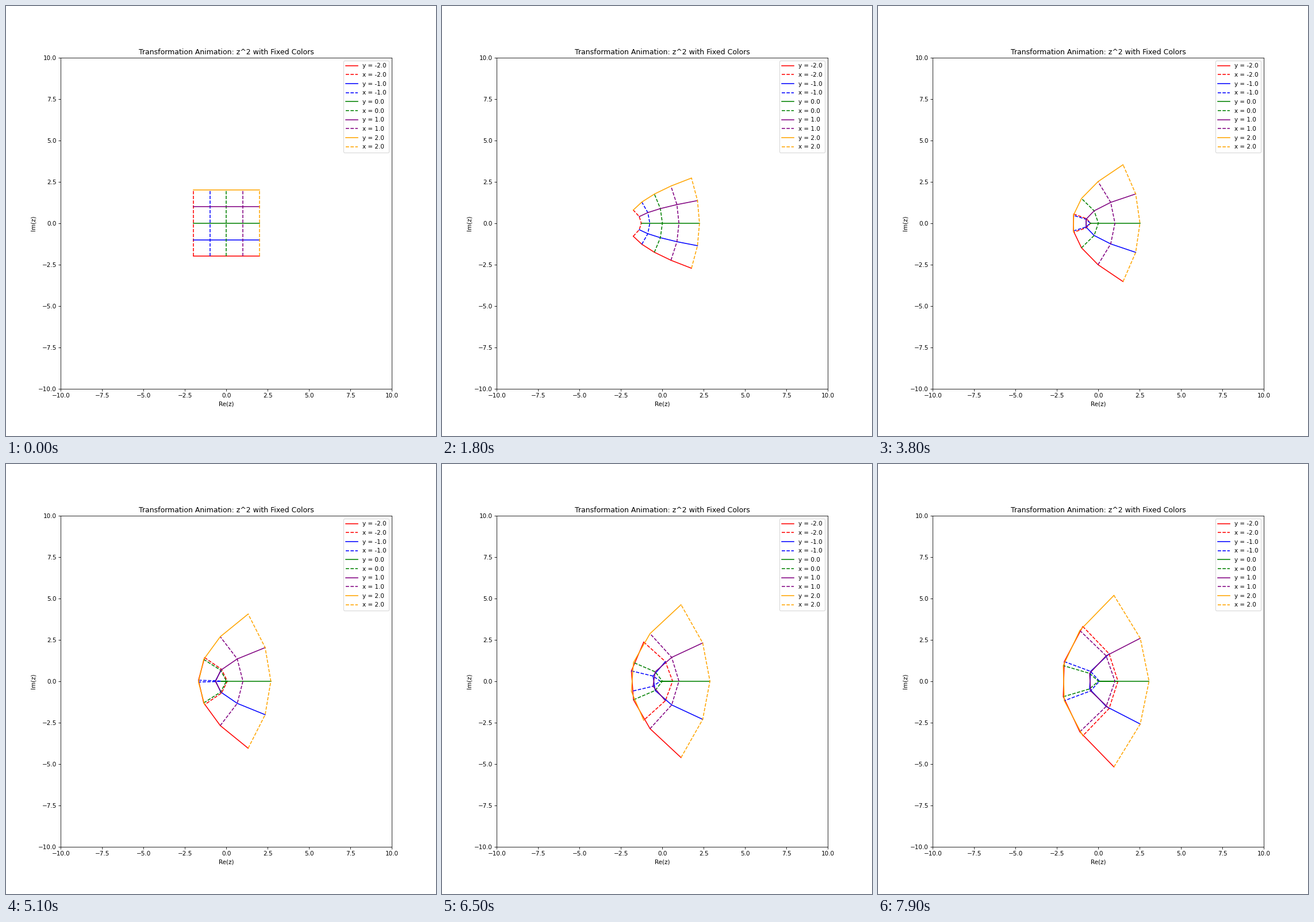
Recreate the animation shown at these times as a matplotlib script. Size 748x748 px, loop 8 s.

```python
import numpy as np
import matplotlib.pyplot as plt
from matplotlib.animation import FuncAnimation

FRAMES, INTERVAL = 80, 100
FULL_STEPS = 149  # steps for the complete morph from z to z^2
COLORS = ["red", "blue", "green", "purple", "orange"]

fig, ax = plt.subplots(figsize=(10, 10), dpi=74.8)
ax.set_xlim(-10, 10)
ax.set_ylim(-10, 10)
ax.set_aspect("equal")
ax.set_title("Transformation Animation: z^2 with Fixed Colors")
ax.set_xlabel("Re(z)")
ax.set_ylabel("Im(z)")

grid = np.linspace(-2, 2, 5)
curves = []
for c, color in zip(grid, COLORS):
    for z, name, style in ((grid + 1j * c, "y", "-"), (c + 1j * grid, "x", "--")):
        line, = ax.plot(z.real, z.imag, style, color=color, label=f"{name} = {c}")
        curves.append((line, z))


def text_height():
    probe = fig.text(0, 0, "lp", fontsize=10)
    height = probe.get_window_extent(fig.canvas.get_renderer()).height
    probe.remove()
    return height


# Legend rows sit 15.67 px apart whatever the rounded text height is
em = 10 * fig.dpi / 72
h = text_height()
ax.legend(loc="upper right", labelspacing=(15.67 - h) / em,
          borderpad=(18.8 - h) / 2 / em)


def update(i):
    t = i / FULL_STEPS
    for line, z in curves:
        w = (1 - t) * z + t * z**2
        line.set_data(w.real, w.imag)
    return [line for line, _ in curves]


anim = FuncAnimation(fig, update, frames=FRAMES, interval=INTERVAL,
                     repeat=True, repeat_delay=0)
plt.show()
```
